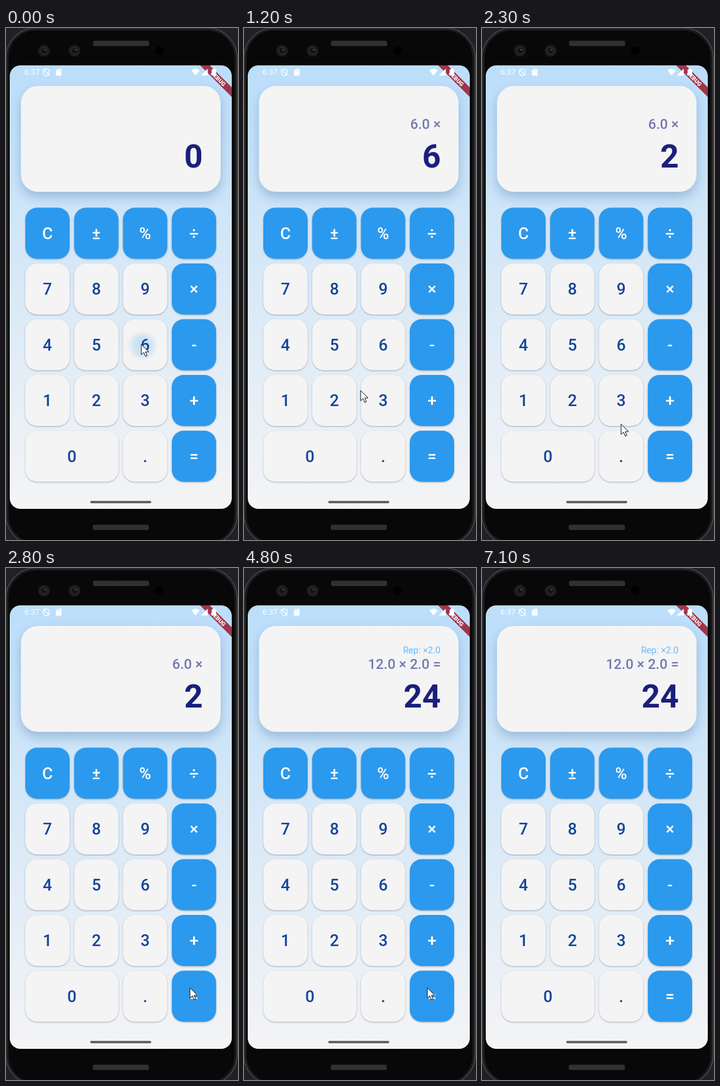
Animation of 372x822 px, one loop 7.3 s. Source, as an HTML page:

```html
<!DOCTYPE html>
<html lang="en">
<head>
<meta charset="utf-8">
<title>Calculator</title>
<style>
  html, body { margin: 0; width: 100%; height: 100%; overflow: hidden; background: #202126; }
  svg { display: block; width: 372px; height: 822px; font-family: Roboto, sans-serif; }
  .key { filter: drop-shadow(0 1.6px 1.3px rgba(30, 40, 60, .34)); }
  .label { font-size: 26px; font-weight: 500; text-anchor: middle; }
  .out { text-anchor: end; }
</style>
</head>
<body>
<svg id="stage" viewBox="0 0 372 822" xmlns="http://www.w3.org/2000/svg">
  <defs>
    <linearGradient id="sky" x1="0" y1="0" x2="0" y2="1">
      <stop offset="0" stop-color="#bbdefb"/>
      <stop offset=".5" stop-color="#d9e9f7"/>
      <stop offset="1" stop-color="#f4f4f5"/>
    </linearGradient>
    <radialGradient id="ink">
      <stop offset="0" stop-color="#2196f3"/>
      <stop offset=".55" stop-color="#2196f3" stop-opacity=".75"/>
      <stop offset="1" stop-color="#2196f3" stop-opacity="0"/>
    </radialGradient>
    <pattern id="mesh" width="3" height="3" patternUnits="userSpaceOnUse">
      <rect width="3" height="3" fill="#202020"/>
      <path d="M0 0L3 3M3 0L0 3" stroke="#474747" stroke-width=".7"/>
    </pattern>
    <filter id="soft" x="-20%" y="-30%" width="140%" height="170%">
      <feGaussianBlur stdDeviation="9"/>
    </filter>
    <clipPath id="screen"><rect x="6" y="60" width="356" height="712" rx="17"/></clipPath>
  </defs>

  <!-- phone body -->
  <rect width="372" height="822" fill="#202126"/>
  <rect x="0" y="0" width="370.5" height="830" rx="48" fill="#0a0a0a" stroke="#5a5a5c" stroke-width="1.2"/>
  <rect x="2.5" y="2.5" width="365.5" height="825" rx="45" fill="#080808" stroke="#1d1d1e" stroke-width="3"/>
  <rect x="139.500" y="20.500" width="90" height="8.500" rx="3" fill="url(#mesh)"/>
  <rect x="139" y="797.500" width="90" height="8.500" rx="3" fill="url(#mesh)"/>
  <g id="lenses"></g>
  <circle cx="246" cy="36.500" r="7" fill="#000"/>

  <g clip-path="url(#screen)">
    <rect x="6" y="60" width="356" height="712" fill="url(#sky)"/>
    <rect x="24" y="102" width="320" height="170" rx="27" fill="#194c8c" opacity=".27" filter="url(#soft)"/>
    <rect x="24" y="93" width="320" height="170" rx="27" fill="#f4f4f4"/>
    <text id="rep" class="out" x="315" y="137" font-size="14.600" fill="#6bb8f3"></text>
    <text id="expr" class="out" x="315.500" y="161.800" font-size="22.300" font-weight="500" fill="#7378b1"></text>
    <text id="total" class="out" x="315.500" y="223.600" font-size="52" font-weight="700" fill="#1a1f7c"></text>
    <g id="keys"></g>

    <g transform="translate(340.500 81.500) rotate(45)">
      <rect x="-45" y="-5.500" width="90" height="11" fill="#9f354c"/>
      <text y="3.300" font-size="9.200" font-weight="900" fill="#fff" text-anchor="middle">DEBUG</text>
    </g>

    <!-- status bar -->
    <text x="29.500" y="75.300" font-size="12.600" fill="#fff">6:37</text>
    <g fill="none" stroke="#fff" stroke-width="1.300">
      <path d="M64.500 65.500L69.300 67.300V71C69.300 74 67.300 76 64.500 76.800C61.700 76 59.700 74 59.700 71V67.300ZM60 66.500L69.500 76"/>
    </g>
    <path d="M83 65.500H89V76.500H80V68.500Z" fill="#fff"/>
    <path d="M82.500 67.500V69.500M84.500 66.700V69.500M86.500 66.700V69.500" stroke="#bbdefb" stroke-width=".8"/>
    <path d="M304 76.500L297.300 68Q304 62.700 310.700 68Z" fill="#fff"/>
    <path d="M323.500 65.200V76.300H312.400Z" fill="#fff"/>
    <path d="M329.700 66.500H331.700V65H335V66.500H337V76.500H329.700Z" fill="#fff"/>
    <rect x="135" y="759.300" width="98" height="3.600" rx="1.800" fill="#5d5f61"/>
  </g>

  <path id="cursor" d="M0 0V16.500L3.900 12.900L6.700 19.200L9.300 18.100L6.600 12H11.900Z" fill="#fff" stroke="#111" stroke-width="1"/>
</svg>
<script>
const LOOP = 7300, STEP = 100;
const $ = id => document.getElementById(id);

function add(parent, tag, attrs, text) {
  const el = document.createElementNS('http://www.w3.org/2000/svg', tag);
  for (const name in attrs) el.setAttribute(name, attrs[name]);
  if (text) el.textContent = text;
  return parent.appendChild(el);
}

for (const x of [61, 110]) {
  add($('lenses'), 'circle', { cx: x, cy: 36.5, r: 9.5, fill: '#1c1c21' });
  add($('lenses'), 'circle', { cx: x, cy: 36.5, r: 5, fill: '#111115', stroke: '#34343b' });
  add($('lenses'), 'circle', { cx: x + 1.5, cy: 35, r: 1.3, fill: '#55555d' });
}

// Keypad; each key has an ink layer clipped to its shape.
const inks = {};
['C±%÷', '789×', '456-', '123+', '0 .='].forEach((row, r) => {
  [...row].forEach((name, c) => {
    if (name === ' ') return;
    const wide = name === '0';
    const blue = r === 0 || c === 3;
    const x = 31 + c * 78.3, y = 288.5 + r * 89.5, w = wide ? 149.5 : 71;
    const box = { x, y, width: w, height: 82, rx: 19 };
    const id = `clip${r}${c}`;
    add(add($('stage').querySelector('defs'), 'clipPath', { id }), 'rect', box);
    add($('keys'), 'rect', { ...box, class: 'key', fill: blue ? '#2b99ed' : '#f4f4f4' });
    const layer = add($('keys'), 'g', { 'clip-path': `url(#${id})` });
    inks[name] = add(layer, 'circle', { fill: 'url(#ink)', opacity: 0 });
    add($('keys'), 'text', {
      class: 'label', x: x + w / 2, y: y + 50.3, fill: blue ? '#fff' : '#14449a'
    }, name);
  });
});

const taps = [
  { key: '6', at: -100, x: 219, y: 510 },
  { key: '×', at: 700, x: 300, y: 420 },
  { key: '2', at: 1550, x: 147, y: 598 },
  { key: '=', at: 2750, x: 295, y: 676 },
  { key: '=', at: 4450, x: 294, y: 676 }
];

// [time, total, expression, repeat note]
const screens = [
  [0, '0', '', ''],
  [100, '6', '', ''],
  [800, '6', '6.0 ×', ''],
  [1700, '2', '6.0 ×', ''],
  [2900, '12', '6.0 × 2.0 =', 'Rep: ×2.0'],
  [4600, '24', '12.0 × 2.0 =', 'Rep: ×2.0']
];

// [time, x, y]
const path = [
  [0, 217, 508], [300, 218, 507], [700, 299, 419], [900, 297, 422],
  [1200, 187, 582], [1500, 151, 598], [2000, 151, 598], [2600, 295, 674],
  [3300, 295, 674], [3700, 294, 674], [5300, 294, 674], [5700, 296, 677], [6600, 296, 677]
];
const HIDE = 6600;

const clamp = v => Math.max(0, Math.min(1, v));
const ease = v => v * v * (3 - 2 * v);
const mix = (a, b, k) => a + (b - a) * k;

function cursorAt(t) {
  const i = path.findIndex(p => p[0] > t);
  if (i < 0) return path[path.length - 1].slice(1);
  const [t0, x0, y0] = path[i - 1], [t1, x1, y1] = path[i];
  const k = ease((t - t0) / (t1 - t0));
  return [mix(x0, x1, k), mix(y0, y1, k)];
}

function drawInk(t) {
  for (const name in inks) inks[name].setAttribute('opacity', 0);
  for (const { key, at, x, y } of taps) {
    const age = t - at;
    if (age < 0 || age > 650) continue;
    const grow = clamp((age - 100) / 150);
    const ink = inks[key];
    ink.setAttribute('cx', x);
    ink.setAttribute('cy', y);
    ink.setAttribute('r', age < 100 ? age * .25 : mix(25, 150, grow));
    ink.setAttribute('opacity', mix(.23, .13, grow) * (1 - clamp((age - 300) / 350)));
  }
}

function draw(t) {
  const [, total, expr, rep] = screens.filter(s => s[0] <= t).pop();
  $('total').textContent = total;
  $('expr').textContent = expr;
  $('rep').textContent = rep;
  drawInk(t);
  const [x, y] = cursorAt(t);
  $('cursor').setAttribute('transform', `translate(${x} ${y})`);
  $('cursor').setAttribute('visibility', t < HIDE ? 'visible' : 'hidden');
}

const start = performance.now();
function tick() {
  const t = (performance.now() - start) % LOOP;
  draw(Math.floor(t / STEP) * STEP);
  requestAnimationFrame(tick);
}
tick();
</script>
</body>
</html>
```
